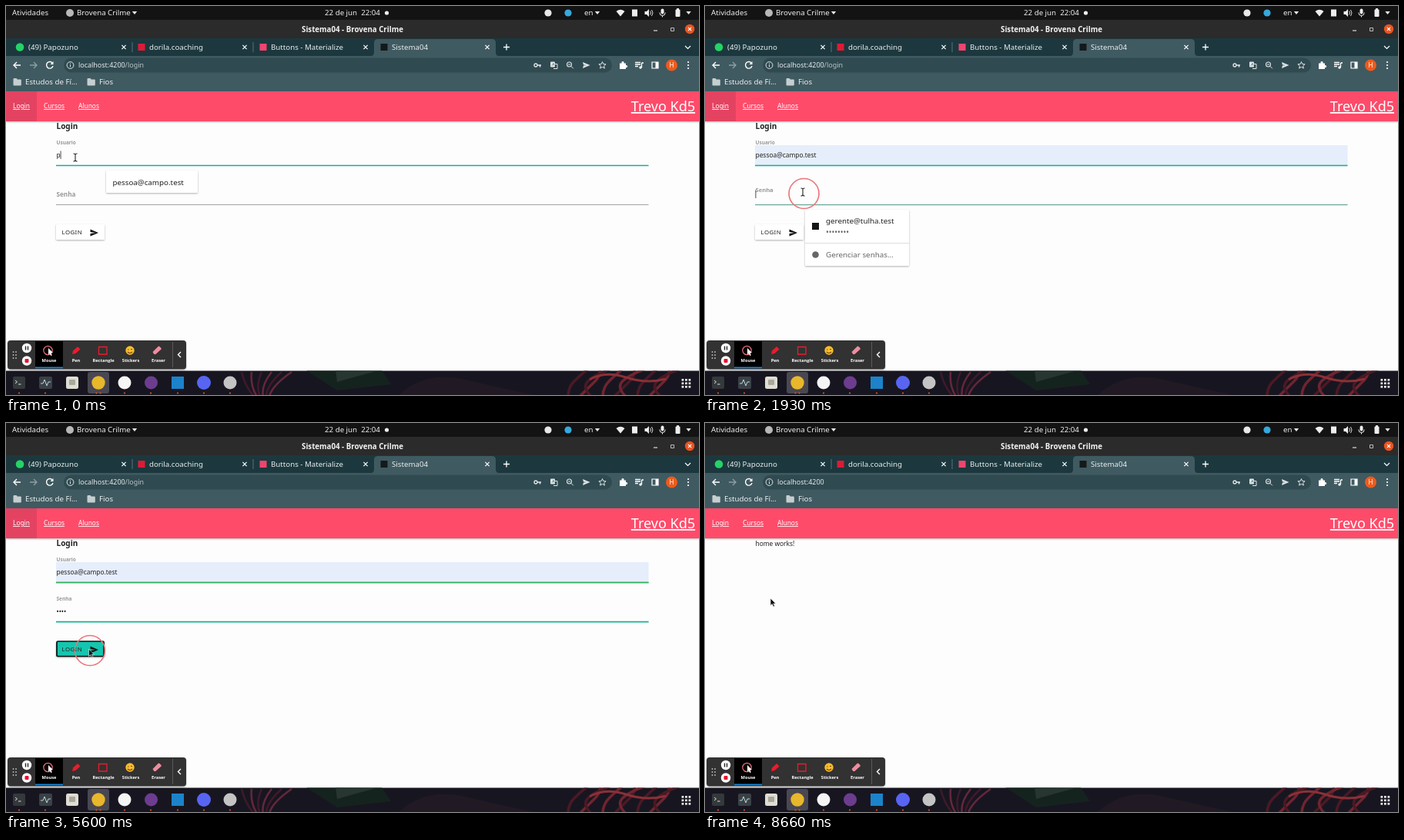
These frames come from a looping animation (900 px wide and 506 px high, 8.86 s). An HTML page:

```html
<!DOCTYPE html>
<html lang="pt-BR">
<head>
<meta charset="utf-8">
<title>Login</title>
<style>
html, body { margin: 0; width: 100%; height: 100%; overflow: hidden; background: #fdfdfd; }
svg { display: block; width: 100%; height: 100%; }
text { font-family: "Noto Sans", "Open Sans", sans-serif; white-space: pre; }
</style>
</head>
<body>
<svg id="stage" viewBox="0 0 900 506"></svg>
<script>
const LOOP = 8860;
const TEAL = '#16ab9a', GREEN = '#35b15c', WHITE = '#fff', PALE = '#dfe6e7';

// Markup helpers
const rect = (x, y, w, h, fill, more = '') => `<rect x="${x}" y="${y}" width="${w}" height="${h}" fill="${fill}" ${more}/>`;
const disc = (x, y, r, fill, more = '') => `<circle cx="${x}" cy="${y}" r="${r}" fill="${fill}" ${more}/>`;
const shape = (d, fill, more = '') => `<path d="${d}" fill="${fill}" ${more}/>`;
const line = (d, color, w = 1, more = '') => `<path d="${d}" fill="none" stroke="${color}" stroke-width="${w}" ${more}/>`;
const text = (x, y, size, fill, s, more = '') => `<text x="${x}" y="${y}" font-size="${size}" fill="${fill}" ${more}>${s}</text>`;
const group = (id, body, more = '') => `<g id="${id}" ${more}>${body}</g>`;
const cross = (x, y, r = 2.6) => line(`M${x - r} ${y - r}l${2 * r} ${2 * r}m0 ${-2 * r}l${-2 * r} ${2 * r}`, WHITE, 1.2);
const caretDown = (x, y) => shape(`M${x - 3.2} ${y - 2}h6.4l-3.2 4z`, '#e6e6e6');
const BOLD = 'font-weight="700"', MID = 'text-anchor="middle"';

function panel() {
  return rect(0, 0, 900, 18, '#131313') +
    text(8, 12.4, 9.7, '#eee', 'Atividades') +
    disc(83, 9, 5, '#b8b8b8') + text(92, 12.4, 9.7, '#eee', 'Brovena Crilme') + caretDown(167, 9) +
    text(450, 12.4, 9.7, '#eee', '22 de jun  22:04', MID) + disc(494.5, 9, 2.6, '#eee') +
    disc(704, 9, 4.6, '#e8e8e8') + disc(730, 9, 4.6, '#36a9dc') +
    text(751, 12.4, 9.7, '#eee', 'en') + caretDown(768, 9) +
    shape('M792.5 7q5.500 -4.500 11 0l-5.500 6.500z', '#eee') + rect(813, 4.500, 7, 9, '#eee') +
    shape('M829.5 7h2.500l3-3v10l-3-3h-2.500z', '#eee') + line('M836.500 6.500q2 2.500 0 5M838.500 5q3 4 0 8', '#ddd') +
    rect(850.5, 3.5, 4, 7, '#eee', 'rx="2"') + line('M848.800 8.500q0 4 3.700 4t3.700 -4M852.500 12.500v2', '#eee') +
    rect(869.500, 4.500, 6, 9.500, '#eee', 'rx="1"') + rect(871, 3, 3, 2, '#eee') + caretDown(886.5, 9);
}

function windowFrame() {
  const tab = (x, fill, name, close) =>
    (fill.r ? disc(x, 53.5, 5.3, fill.c) : rect(x - 4.5, 49, 9, 9, fill.c)) +
    text(fill.tx, 57, 9.7, '#e9eeee', name) + cross(close, 53.5);
  return rect(0, 18, 900, 24, '#2b2b2b') +
    text(450, 33.5, 9.7, '#f3f3f3', 'Sistema04 - Brovena Crilme', MID + ' ' + BOLD) +
    line('M841 32h5', WHITE) + line('M863.500 28.500h4v4h-4z', '#ccc', .9) +
    disc(888, 30, 6.2, '#e95420') + cross(888, 30, 2.1) +
    rect(0, 42, 900, 23, '#1c383e') +
    shape('M474 65q4 0 4-5v-12q0-5 5-5h148q5 0 5 5v12q0 5 4 5z', '#405a61') +
    line('M164 47v13M321 47v13', '#587078') +
    tab(18, { c: '#25d366', r: 1, tx: 29 }, '(49) Papozuno', 153) +
    tab(176, { c: '#dd1b36', tx: 186 }, 'dorila.coaching', 310) +
    tab(334, { c: '#f0446d', tx: 344 }, 'Buttons - Materialize', 467) +
    tab(491, { c: '#14191b', tx: 501 }, 'Sistema04', 625) +
    line('M646 53.500h8m-4-4v8', WHITE, 1.300) + line('M882 52l3.500 3.500 3.500-3.500', WHITE, 1.200);
}

function toolbar() {
  const folder = x => shape(`M${x} 95q0-1 1-1h3l1.300 1.500h4q1 0 1 1v6q0 1-1 1h-8.300q-1 0-1-1z`, '#c5ced0');
  return rect(0, 65, 900, 46, '#405a61') + rect(75, 67.500, 712, 19, '#304a51', 'rx="9.5"') +
    line('M19 77h-9m4-4l-4 4 4 4', WHITE, 1.400) + line('M31 77h9m-4-4l4 4-4 4', '#8b9ea3', 1.400) +
    line('M60.500 74.500a4.300 4.300 0 1 0 .500 3.500', WHITE, 1.400) + shape('M61.500 72v4h-4z', WHITE) +
    disc(83.500, 77, 4.400, 'none', `stroke="${PALE}"`) + line('M83.500 76.300v3M83.500 74.300v1', PALE) +
    `<text x="94" y="80" font-size="8.95" fill="#e6eced">localhost:4200<tspan id="route" fill="#b9c5c8">/login</tspan></text>` +
    disc(688, 77, 2, 'none', `stroke="${PALE}" stroke-width="1.3"`) + line('M690 77h5M693.500 77v2.500', PALE, 1.500) +
    rect(707, 72.500, 6, 7, PALE, 'rx="1"') + line('M712.500 75.500h3.500v6h-5', PALE) + line('M709 77.500l2-3 1 3', '#405a61', .7) +
    disc(731.500, 76, 3, 'none', `stroke="${PALE}" stroke-width="1.1"`) + line('M733.800 78.300l3 3M730 76h3', PALE) +
    shape('M749 73l9.500 4-9.500 4 1-3.400 4-.6-4-.6z', PALE) +
    line('M774.500 72.500l1.300 3 3.300.300-2.500 2.100.800 3.200-2.900-1.700-2.900 1.700.800-3.200-2.500-2.100 3.300-.300z', PALE) +
    shape('M797 74.500h2.500q-.5-2.500 1.500-2.500t1.500 2.500h2.500v2.500q2.200-.3 2.200 1.500t-2.200 1.500v2h-8z', WHITE) +
    line('M817 73.500h7M817 76h7M817 78.500h4M825.500 74v6M825.500 74h2.500', WHITE, 1.300) + disc(824, 80, 1.700, WHITE) +
    line('M839 73h8v8h-8z', WHITE, 1.200) + rect(843.500, 73, 3.500, 8, WHITE) +
    disc(864.500, 77, 7.500, '#ee5b1c') + text(864.500, 80, 8, WHITE, 'H', MID) +
    [73, 77, 81].map(y => disc(886, y, 1.100, WHITE)).join('') +
    folder(9.500) + text(25, 102.300, 9.700, '#edf1f2', 'Estudos de Fí…') +
    folder(105.500) + text(121, 102.300, 9.700, '#edf1f2', 'Fios');
}

const LINKS = [['Login', 9, 0, 40], ['Cursos', 49, 40, 85], ['Alunos', 94, 85, 131]];
function navbar() {
  return rect(0, 111, 900, 39, '#ff4b6b', 'filter="url(#soft)"') + rect(0, 111, 40, 39, '#e34361', 'id="active"') +
    LINKS.map(([s, x], i) => text(x, 133, 8.4, WHITE, s, `id="link${i}" text-decoration="underline"`)).join('') +
    text(895, 137, 18, WHITE, 'Trevo Kd5', 'text-anchor="end" text-decoration="underline"');
}

function loginPage() {
  const card = 'rx="1.5" filter="url(#soft)"';
  const first = rect(130, 214, 119, 29, WHITE, card) + rect(130, 217, 119, 23, '#eee', 'id="hover"') +
    text(138.500, 232.500, 9.800, '#222', 'pessoa@campo.test');
  const second = rect(130, 265, 135, 73, WHITE, card) + rect(139, 282, 9, 9, '#161616') +
    text(157, 282.500, 9.800, '#222', 'gerente@tulha.test') + text(157, 297.500, 10, '#666', '••••••••') +
    line('M130 308.500h135', '#ddd') + disc(143.500, 323.500, 4.300, '#666') +
    text(157, 327, 9.800, '#666', 'Gerenciar senhas…');
  return text(65.500, 160, 10, '#222', 'Login', BOLD) +
    text(65.500, 179.500, 6.500, '#999', 'Usuario', BOLD) +
    rect(65, 181, 769.500, 26, '#e6eefc', 'id="autofill"') +
    line('M65 207.600h769.500', TEAL, 1.500) + line('M65 207.600h769.500', GREEN, 1.500, 'id="valid"') +
    text(65.500, 197, 8.400, '#222', '', 'id="user"') +
    line('M65 258.500h769.500', '#999', .9) + line('M65 258.600h769.500', '#13b294', 1.600, 'id="passLine"') +
    text(65.500, 248, 8.200, '#999', 'Senha', `id="passLabel" ${BOLD}`) +
    text(65.500, 248, 8.400, '#111', '', 'id="pass"') +
    rect(0, 0, .8, 10.500, '#222', 'id="caret"') +
    rect(65, 284, 63, 20, WHITE, card) +
    disc(0, 0, 0, '#15c6ae', 'id="ripple" clip-path="url(#button)"') +
    rect(66, 284, 61, 19.500, 'none', 'id="focus" rx="1.5" stroke="#101010" stroke-width="1.7"') +
    text(72.500, 296.600, 7.900, '#222', 'LOGIN', 'letter-spacing=".4"') +
    shape('M109.500 290.500l10.500 4.500-10.500 4.500v-3.500l7-1-7-1z', '#111') +
    group('userMenu', first) + group('passMenu', second);
}

function recorder() {
  const label = (x, s) => text(x, 463, 5.700, WHITE, s, `${MID} ${BOLD} style="font-family:'Open Sans',sans-serif"`);
  const grip = [450, 454, 458].map(y => disc(9.500, y, .9, '#bbb') + disc(13, y, .9, '#bbb')).join('');
  return rect(2, 435, 232, 37.500, '#303030', 'rx="4" filter="url(#soft)"') + grip +
    disc(27, 445, 6.200, WHITE) + line('M25.500 442.500v5M28.500 442.500v5', '#222', 1.400) +
    disc(27, 461.500, 6.200, WHITE) + rect(24.500, 459, 5, 5, '#e8112d', 'rx="1"') +
    rect(38, 436, 36, 35, '#000') + rect(38, 469.500, 36, 1.700, '#1686d9') +
    disc(54.500, 448, 5.700, 'none', 'stroke="#f0707b" stroke-width="1.2"') +
    shape('M55 445l6 6-2.700.2 1.500 3-1.500.7-1.400-3-1.900 1.800z', WHITE) +
    shape('M86 453l1-4.500 6-5.500 3.500 3.500-6 5.500z', '#ea1c2c') +
    line('M120.500 443.500h10.500v9.500h-10.500z', '#ea1c2c', 1.300) +
    disc(161, 448, 5.700, '#f9bd2c') + line('M158 447h1.500M162 446.500h2M158 450q3 3 6 0', '#7a3b10', 1.100) +
    shape('M190.500 450l7-7q1-1 2 0l2 2q.8 1-.2 1.800l-7 6.200h-2z', '#f08c9f') +
    label(56, 'Mouse') + label(91, 'Pen') + label(126.500, 'Rectangle') + label(162, 'Stickers') + label(198, 'Eraser') +
    line('M216.500 437v33', '#666', .8) + line('M227 450l-3.500 3.500 3.500 3.500', WHITE, 1.400);
}

function dock() {
  const dots = [17, 51, 117.500, 122.500, 154, 188, 223, 257, 291].map(x => disc(x, 503.500, 1.100, '#e95420')).join('');
  let coral = '';
  for (let i = 0; i < 9; i++) {
    const x = 730 + i * 15, lean = 14 * Math.sin(i * 2.1);
    coral += line(`M${x} 508q${lean} -12 ${lean + 8} -20t${18 - lean} -16`, i % 2 ? '#70242f' : '#4b1924', 3.500);
  }
  for (let i = 0; i < 6; i++)
    coral += line(`M${322 + i * 4} 508q${-12 + i * 3} -14 ${-16 + i * 9} -32`, i % 2 ? '#65273b' : '#40192c', 2.500);
  let grid = '';
  for (let i = 0; i < 9; i++) grid += rect(877.500 + i % 3 * 4.500, 485 + (i / 3 | 0) * 4.500, 2.700, 2.700, '#eee');
  return rect(0, 474.500, 900, 32, '#171620') +
    `<g clip-path="url(#dockArea)">` + shape('M390 474h98l12 18-70 8z', '#15231f') + shape('M428 474l52 1-50 14z', '#273630') +
    shape('M510 506q35-32 86-20t90 20z', '#211923') + coral +
    line('M758 486q20-12 47-3t52 2', '#8b3037', 3) + '</g>' +
    rect(106, 476, 28, 28, '#494751', 'rx="3"') +
    rect(9, 482, 16, 16, '#34393b', 'rx="2"') + line('M12 487l2.500 2-2.500 2M16 492h3.500', '#ddd') +
    rect(43, 482, 17, 16, '#3a4146', 'rx="2"') + line('M45 491h3l2-5 3 8 2-5h3', '#b7d5d5') +
    rect(78, 482, 16, 16, '#e0ded3', 'rx="2.5"') + rect(82, 486, 8, 7, '#aaa79b', 'rx="1"') +
    disc(120, 490, 8.700, '#e8b72c') + disc(154, 490, 8.500, '#f5f5f5') + disc(188.500, 490, 8.500, '#6c3d8f') +
    rect(215, 482, 16, 16, '#1c83cb') + disc(257, 490, 9, '#5865f2') +
    disc(291, 490, 8.500, '#c4c4c4') + dots + grid;
}

function pointer() {
  const beam = line('M-2.500-5q2.500 0 2.500 1.500v7q0 1.500-2.500 1.500M2.500-5q-2.500 0-2.500 1.500M0 3.500q0 1.500 2.500 1.500', '#222', 1.100);
  const arrow = shape('M0 0v9.500l2.200-2 1.600 3.600 1.700-.8-1.600-3.400h3z', '#111', 'stroke="#fff" stroke-width=".6"');
  const hand = shape('M-1 0q1.200-1 2 0v4l4.500 1q1.500.5 1.200 2l-.7 4h-6l-3.500-4.500q0-1.500 2.500 0z', WHITE, 'stroke="#111" stroke-width=".9"');
  return disc(0, 0, 19.500, 'none', 'id="ring" stroke="#ec7377" stroke-width="1.6"') +
    group('cursor', group('beam', beam) + group('arrow', arrow) + group('hand', hand));
}

const stage = document.getElementById('stage');
stage.innerHTML = `<defs>
  <filter id="soft" x="-10%" y="-20%" width="120%" height="150%"><feDropShadow dx="0" dy="1" stdDeviation="1" flood-opacity=".3"/></filter>
  <clipPath id="button"><rect x="65" y="284" width="63" height="20" rx="1.5"/></clipPath>
  <clipPath id="dockArea"><rect y="474.5" width="900" height="32"/></clipPath></defs>` +
  rect(0, 0, 900, 506, '#fdfdfd') + navbar() + group('login', loginPage()) +
  text(65.500, 159.500, 8.400, '#222', 'home works!', 'id="home"') +
  panel() + windowFrame() + toolbar() + dock() + recorder() + pointer();

const el = {};
stage.querySelectorAll('[id]').forEach(n => el[n.id] = n);
const set = (id, attrs) => { for (const k in attrs) el[id].setAttribute(k, attrs[k]); };
const show = (id, on) => el[id].setAttribute('visibility', on ? 'inherit' : 'hidden');
const write = (id, s) => { if (el[id].textContent !== s) el[id].textContent = s; };

const clamp = v => Math.max(0, Math.min(1, v));
const ramp = (t, from, ms) => clamp((t - from) / ms);
const easeOut = p => 1 - (1 - p) ** 2;

// Pointer path: time, x, y
const PATH = [[0, 90, 197], [60, 90, 197], [660, 77, 209], [930, 163, 229], [1200, 163, 229],
  [1800, 127, 242], [4660, 127, 242], [5260, 107.500, 294], [6200, 107.500, 294], [6550, 82, 168],
  [6800, 43, 133.500], [7060, 24, 131], [7130, 24, 131], [7560, 106, 131], [8000, 62, 152],
  [8460, 85, 228], [LOOP, 85, 228]];
function pointAt(t) {
  const i = PATH.findIndex((k, n) => n && t <= k[0]);
  const [t0, x0, y0] = PATH[i - 1], [t1, x1, y1] = PATH[i];
  const p = clamp((t - t0) / (t1 - t0)), s = p * p * (3 - 2 * p);
  return [x0 + (x1 - x0) * s, y0 + (y1 - y0) * s];
}

const PICK = 1070, FOCUS = 1880, PRESS = 5450, LEAVE = 5730;
const KEYS = [3400, 3660, 3860, 4060];
const CLICKS = [1000, FOCUS - 20, PRESS];

function render(t) {
  const [x, y] = pointAt(t);
  const atHome = t >= LEAVE, typed = KEYS.filter(k => t >= k).length;
  const inside = (l, top, r, b) => x >= l && x < r && y >= top && y < b;

  show('login', !atHome);
  show('home', atHome);
  show('active', !atHome);
  show('route', !atHome);

  // User field and its suggestion
  const menu = t < PICK, over = menu && inside(130, 214, 249, 243);
  const filled = over || !menu;
  show('userMenu', menu && !atHome);
  show('hover', over);
  show('autofill', filled);
  write('user', filled ? 'pessoa@campo.test' : 'p');
  set('valid', { opacity: ramp(t, FOCUS, 300) });

  // Password field
  const lift = easeOut(ramp(t, FOCUS, 260));
  set('passLabel', { y: 248 - 17.500 * lift, 'font-size': 8.200 - 1.700 * lift });
  set('passLine', { opacity: lift });
  show('passMenu', t >= FOCUS && !typed && !atHome);
  write('pass', '•'.repeat(typed));

  // The caret restarts its blink with every edit
  const inPass = t >= FOCUS;
  const since = typed ? KEYS[typed - 1] : inPass ? 1930 : menu ? -400 : PICK;
  const lit = (Math.max(0, t - since) % 1200) < 600;
  const field = inPass ? 'pass' : 'user';
  const width = el[field].textContent ? el[field].getComputedTextLength() : 0;
  show('caret', lit && t < PRESS && !over);
  set('caret', { x: 65.500 + width, y: inPass ? 239.500 : 188.500 });

  // Button
  const pressed = t >= PRESS && !atHome;
  show('focus', pressed);
  set('ripple', { cx: 107.500, cy: 294, r: pressed ? 55 * easeOut(ramp(t, PRESS, 150)) : 0 });

  // Links
  const bar = y >= 111 && y < 150;
  LINKS.forEach(([, , l, r], i) => set('link' + i, { fill: bar && x >= l && x < r ? '#1a22c8' : WHITE }));

  // Pointer
  const beam = !atHome && !over && (inside(65, 181, 834, 208) || inside(65, 232, 834, 259));
  const hand = bar && x < 131;
  show('beam', beam);
  show('hand', hand);
  show('arrow', !beam && !hand);
  set('cursor', { transform: `translate(${x} ${y})` });

  const click = CLICKS.find(c => t >= c && t < c + 400);
  show('ring', click !== undefined);
  if (click !== undefined)
    set('ring', { cx: x + 1.500, cy: y + 2, r: 8 + 11.500 * ramp(t, click, 70), opacity: 1 - ramp(t, click + 160, 240) });
}

const start = performance.now();
function tick() {
  render((performance.now() - start) % LOOP);
  requestAnimationFrame(tick);
}
tick();
</script>
</body>
</html>
```
